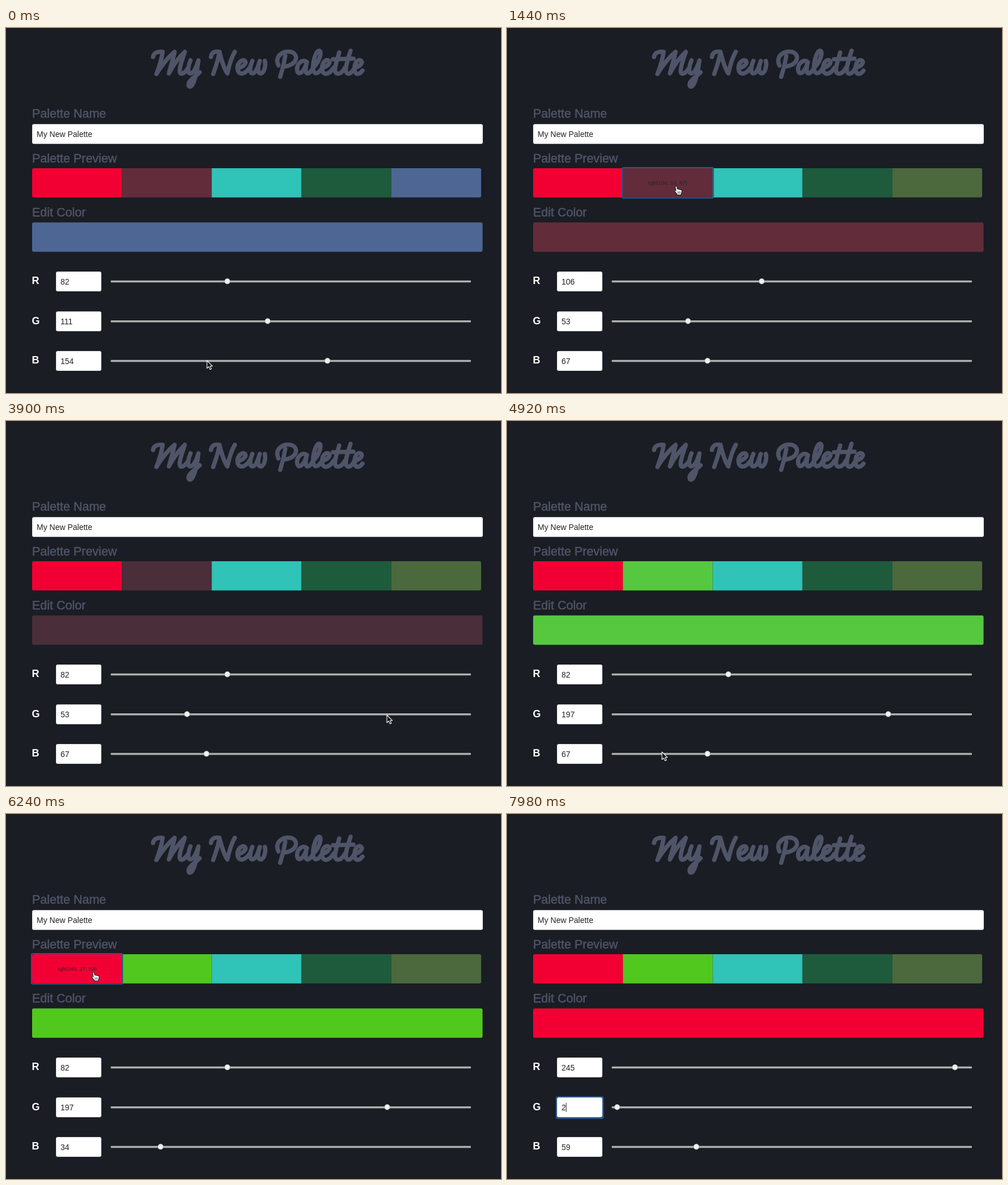
Write an HTML page with a canvas that moves like this. It is 872 px wide and 643 px high and loops after 8 s.

```html
<!DOCTYPE html>
<html lang="en">
<head>
<meta charset="utf-8">
<title>My New Palette</title>
<style>
html, body { margin: 0; width: 100%; height: 100%; overflow: hidden; background: #1a1d23; }
canvas { display: block; }
</style>
</head>
<body>
<canvas width="872" height="643" aria-label="My New Palette"></canvas>
<script>
const ctx = document.querySelector('canvas').getContext('2d');
const LOOP = 8000, STEP = 60;
const SANS = '"Liberation Sans", Arial, sans-serif';
const MUTED = '#4f5468', FOCUS = '#2a5590';
const SWATCH = { x: 46, y: 247, w: 158.2, h: 51.5 };
const ROWS = [446.5, 516.7, 586.5];

// Script lettering, one line per letter
const title = new Path2D(`
  M259 51 C260 43 268 41 276 42 C274 56 270 68 265 81 C274 66 285 52 297 42
  C294 56 290 68 287 80 C295 65 304 52 315 42 C311 55 305 68 306 77 C307 84 315 80 321 70
  M325 57 C321 66 319 79 324 80 C330 81 335 70 339 57 C337 72 334 88 330 97 C326 106 320 105 322 97 C324 91 333 86 341 78
  M361 51 C362 43 368 40 376 42 C374 56 369 70 365 81 M376 42 C380 58 384 72 390 80 C393 66 397 52 403 42
  M408 71 C418 69 424 62 421 58 C416 53 406 63 408 73 C410 84 421 82 429 70
  M434 58 C430 66 428 80 434 80 C440 80 444 68 447 58 C443 70 443 80 449 80 C455 79 458 66 456 58
  M492 49 C490 62 487 74 483 86 M480 66 C472 50 488 39 502 42 C517 46 513 66 490 68
  M530 60 C522 53 511 64 513 75 C515 85 525 78 530 60 C527 72 527 81 532 80 C536 79 539 74 541 70
  C552 60 557 42 552 40 C546 39 540 60 541 72 C542 83 550 82 557 70
  C566 68 572 62 569 58 C563 53 556 62 557 73 C558 85 570 82 577 70
  M587 43 C583 58 578 70 580 77 C583 84 592 80 597 70 M576 55 L612 54
  M607 40 C602 56 597 70 599 77 C602 84 609 80 614 70
  C623 68 629 62 626 58 C620 53 613 62 614 73 C615 84 623 82 628 75`);

const arrow = new Path2D('M0 0 V13.5 L3.2 10.6 L5.4 15.6 L7.8 14.6 L5.6 9.7 H9.6 Z');
const hand = new Path2D(`M-1.5 0 C-1.5 -2 1 -2 1.4 0 L2.5 4 C4 3 5 3.5 5.3 4.5 C6.5 3.7 7.7 4.2 8 5.2
  C9.3 4.8 10.2 5.5 10.2 7 C10.2 10 9 11 8.7 14 H2 C1 11 -2 9 -3 7 C-3.5 5.5 -1.8 5 -0.2 7 Z`);
const beam = new Path2D('M-3 -7 Q0 -7 0 -5 V5 Q0 7 -3 7 M3 -7 Q0 -7 0 -5 M0 5 Q0 7 3 7');

// Pointer stops: time, x, y
const pointerStops = [
  [0, 354, 586], [300, 354, 586], [1200, 298, 280], [1620, 298, 280],
  [2340, 390, 445], [2640, 390, 445], [3720, 671, 518], [4260, 671, 518],
  [4860, 273, 583], [5220, 273, 583], [6060, 154, 280], [6480, 154, 280], [7200, 122, 517]
];

// Edited values: time, selected swatch, rgb, colour as seen on screen
const edits = [
  [0, 4, [82, 111, 154], '#4d6694'],
  [300, 4, [82, 111, 67], '#4c683d'],
  [1380, 1, [106, 53, 67], '#622c3a'],
  [2400, 1, [82, 53, 67], '#4a2e3a'],
  [4080, 1, [82, 197, 67], '#55c83f'],
  [5100, 1, [82, 197, 34], '#51c81e'],
  [6300, 0, [245, 27, 59], '#f20033'],
  [7800, 0, [245, 2, 59], '#f20033']
];

function pointerAt(t) {
  const next = pointerStops.findIndex(stop => stop[0] > t);
  if (next < 0) return pointerStops.at(-1).slice(1);
  const [t0, x0, y0] = pointerStops[next - 1], [t1, x1, y1] = pointerStops[next];
  const p = (t - t0) / (t1 - t0), e = p * p * (3 - 2 * p);
  return [x0 + (x1 - x0) * e, y0 + (y1 - y0) * e];
}

function stateAt(t) {
  const colors = ['#f20033', '#622c3a', '#30c3b7', '#1e5b3d', '#4d6694'];
  const values = [[245, 27, 59], [106, 53, 67], [57, 196, 182], [35, 100, 67], [82, 111, 154]];
  let selected;
  for (const [start, index, rgb, color] of edits) {
    if (start > t) break;
    selected = index;
    values[index] = rgb;
    colors[index] = color;
  }
  return { colors, values, selected };
}

function box(x, y, w, h, fill, radius = 3) {
  ctx.fillStyle = fill;
  ctx.beginPath();
  ctx.roundRect(x, y, w, h, radius);
  ctx.fill();
}

function ring(x, y, w, h, width) {
  ctx.strokeStyle = FOCUS;
  ctx.lineWidth = width;
  ctx.beginPath();
  ctx.roundRect(x, y, w, h, 2);
  ctx.stroke();
}

function text(str, x, y, font, fill) {
  ctx.font = `${font} ${SANS}`;
  ctx.fillStyle = fill;
  ctx.fillText(str, x, y);
}

function label(str, y) {
  text(str, 46, y, '21.5px', MUTED);
  ctx.strokeStyle = MUTED;
  ctx.lineWidth = 0.5;
  ctx.strokeText(str, 46, y);
}

function input(x, y, w, value) {
  box(x, y, w, 35, '#c8c8c8');
  box(x + 0.5, y + 0.5, w - 1, 34, '#fff');
  text(value, x + 8, y + 22.5, '14px', '#222');
}

function drawSwatches(colors, values, hovered, focused) {
  const { x, y, w, h } = SWATCH;
  colors.forEach((color, i) =>
    box(x + i * w, y, w, h, color, i === 0 ? [3, 0, 0, 3] : i === 4 ? [0, 3, 3, 0] : 0));
  if (focused >= 0) ring(x + focused * w - 1, y - 1, w + 2, h + 2, 2);
  if (hovered >= 0) {
    ctx.textAlign = 'center';
    text(`rgb(${values[hovered].join(', ')})`, x + (hovered + 0.5) * w, 276, '9.7px', 'rgba(34,34,40,.85)');
    ctx.textAlign = 'left';
  }
}

function drawRow(name, y, value, focused) {
  text(name, 45.5, y + 4.8, 'bold 18px', '#fff');
  if (focused) ring(87.5, y - 18, 81.5, 37, 3);
  input(88, y - 17.5, 80, value);
  if (focused) {
    ctx.fillStyle = '#222';
    ctx.fillRect(96 + ctx.measureText(value).width, y - 8, 1, 16);
  }
  box(184.5, y - 1.7, 634.5, 3.4, '#aeafb0', 1);
  ctx.beginPath();
  ctx.arc(189.1 + value * 2.449, y - 0.3, 4.9, 0, 7);
  ctx.fillStyle = '#f0f0f0';
  ctx.fill();
  ctx.strokeStyle = '#85878a';
  ctx.lineWidth = 0.6;
  ctx.stroke();
}

function drawPointer(x, y, hovered) {
  const overInput = x > 88 && x < 168 && ROWS.some(row => Math.abs(y - row) < 17);
  ctx.save();
  ctx.translate(x, y);
  ctx.lineJoin = 'round';
  ctx.lineWidth = 1.1;
  if (overInput) {
    ctx.strokeStyle = '#222';
    ctx.stroke(beam);
  } else {
    const shape = hovered >= 0 ? hand : arrow;
    ctx.fillStyle = hovered >= 0 ? '#fff' : '#111';
    ctx.strokeStyle = hovered >= 0 ? '#111' : '#fff';
    ctx.fill(shape);
    ctx.stroke(shape);
    if (hovered >= 0) {
      ctx.lineWidth = 0.7;
      ctx.stroke(new Path2D('M3 8 V11.5 M5 8 V11.5 M7 8 V11.5'));
    }
  }
  ctx.restore();
}

function draw(t) {
  const { colors, values, selected } = stateAt(t);
  const [x, y] = pointerAt(t);
  const inBar = y >= SWATCH.y && y <= SWATCH.y + SWATCH.h;
  const hovered = inBar ? Math.floor((x - SWATCH.x) / SWATCH.w) : -1;
  const focused = t >= 1320 && t < 2400 ? 1 : t >= 6180 && t < 7320 ? 0 : -1;

  ctx.fillStyle = '#1a1d23';
  ctx.fillRect(0, 0, 872, 643);

  ctx.strokeStyle = MUTED;
  ctx.lineWidth = 7.5;
  ctx.lineCap = ctx.lineJoin = 'round';
  ctx.stroke(title);

  label('Palette Name', 158);
  input(46, 169.3, 794, 'My New Palette');
  label('Palette Preview', 237);
  drawSwatches(colors, values, hovered, focused);
  label('Edit Color', 331.5);
  box(46, 342.5, 793.5, 51.7, colors[selected]);

  ROWS.forEach((rowY, i) => drawRow('RGB'[i], rowY, values[selected][i], i === 1 && t >= 7320));
  if (t < 7800) drawPointer(x, y, hovered);
}

const start = performance.now();
function tick() {
  const t = (performance.now() - start) % LOOP;
  draw(Math.floor(t / STEP) * STEP);
  requestAnimationFrame(tick);
}
tick();
</script>
</body>
</html>
```
